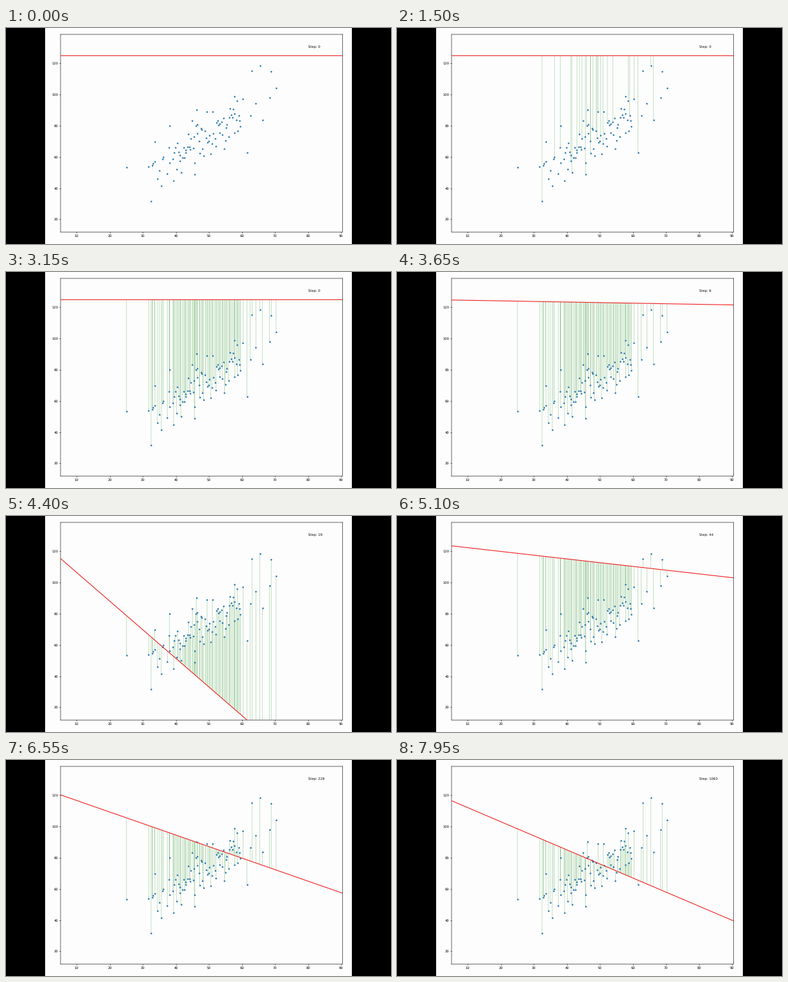
Recreate the animation shown at these times as a matplotlib script. Size 600 by 338 pixels, loop 8 s.

```python
import numpy as np
import matplotlib.pyplot as plt
from matplotlib.animation import FuncAnimation
from matplotlib.collections import LineCollection
from matplotlib.patches import Rectangle

W, H, DPI = 600, 338, 32
FRAMES, INTERVAL = 160, 50
PT = 72 / DPI  # points per pixel
PAPER = "#fdfdfd"

plt.rcParams.update({
    "font.family": "DejaVu Sans",
    "font.size": 5.3 * PT,
    "text.hinting": "none",
})


def make_points(total=100, early=26):
    """A rising cloud with a few fixed points around its rim."""
    rng = np.random.default_rng(12)
    opening = [(32.5, 31.7), (61.5, 62.6), (60.3, 97.4), (45.6, 48.8),
               (66.2, 83.9), (65.4, 118.6)]
    rim = [(25.1, 53.5), (35.6, 41.4), (39.3, 44.9), (33.6, 69.9),
           (38.1, 80.2), (46.2, 90.1), (57.8, 99.0), (62.5, 86.5),
           (64.2, 94.4), (63.0, 115.2), (68.8, 114.9), (68.3, 97.9),
           (70.3, 104.3)]
    n = total - len(opening) - len(rim)
    u = (np.arange(n) + rng.uniform(0, 1, n)) / n
    x = np.interp(u, [0, 0.15, 1], [31.6, 39.5, 59.8])
    spread = np.interp(x, [32, 44], [4, 8])
    y = 68 + 1.3 * (x - 45) + spread * rng.normal(0, 1, n).clip(-1.9, 1.9)
    cloud = rng.permutation(np.column_stack([x, y]))
    split = early - len(opening)
    rest = rng.permutation(np.vstack([cloud[split:], rim]))
    return np.vstack([opening, cloud[:split], rest])


def shown_residuals(frame):
    t = np.clip((frame - 16) / 47, 0, 1)
    return int(round(len(px) * t ** 1.11))


def step_at(frame):
    """Steady at first, then exponentially faster."""
    if frame <= 88:
        return max(0, round((frame - 66) * 19 / 22))
    keys = np.log(np.array([19, 94, 228, 1063]) + 3)
    return round(np.exp(np.interp(frame, [88, 115, 131, 159], keys)) - 3)


def fit_at(step):
    """Gradient descent: the slope overshoots each step, the intercept drifts."""
    intercept = 8 + 117 * np.exp(-3.04e-5 * step)
    swing = (-1) ** step * 0.9935 ** step
    slope = -0.977 * (1 - swing) + 0.01965 * (125 - intercept)
    return slope, intercept


px, py = make_points().T

fig = plt.figure(figsize=(W / DPI, H / DPI), dpi=DPI, facecolor="black")
fig.add_artist(Rectangle((60.6 / W, 0), 478 / W, 1, transform=fig.transFigure,
                         fc=PAPER, ec="none", zorder=-1))

left, right, top, bottom = 85, 524.6, 10, 319.2
ax = fig.add_axes([left / W, 1 - bottom / H, (right - left) / W, (bottom - top) / H],
                  facecolor=PAPER)
ax.set_xlim(5.15, 90.41)
ax.set_ylim(11.84, 138.66)
ax.set_xticks(range(10, 91, 10))
ax.set_yticks(range(20, 121, 20))
ax.tick_params(length=1.9 * PT, width=0.6 * PT, pad=1.9 * PT)
for spine in ax.spines.values():
    spine.set_linewidth(0.6 * PT)
    spine.set_snap(False)

residuals = LineCollection([], colors="green", linewidths=0.5 * PT, alpha=0.45,
                           zorder=2)
residuals.set_snap(False)
ax.add_collection(residuals, autolim=False)
ax.plot(px, py, "o", color="#1a6fa8", ms=2.5 * PT, mew=0, zorder=3)
line, = ax.plot([], [], color="#ee1c1c", lw=1.1 * PT, zorder=4, snap=False)
label = ax.text(80, 130, "")
ends = np.array([0, 100])


def update(frame):
    step = step_at(frame)
    slope, intercept = fit_at(step)
    count = shown_residuals(frame)
    fitted = slope * px + intercept
    residuals.set_segments([[(x, y), (x, f)]
                            for x, y, f in zip(px[:count], py, fitted)])
    line.set_data(ends, slope * ends + intercept)
    label.set_text(f"Step: {step}")
    return residuals, line, label


anim = FuncAnimation(fig, update, frames=FRAMES, interval=INTERVAL,
                     init_func=lambda: update(0), repeat=True, repeat_delay=0)
plt.show()
```
